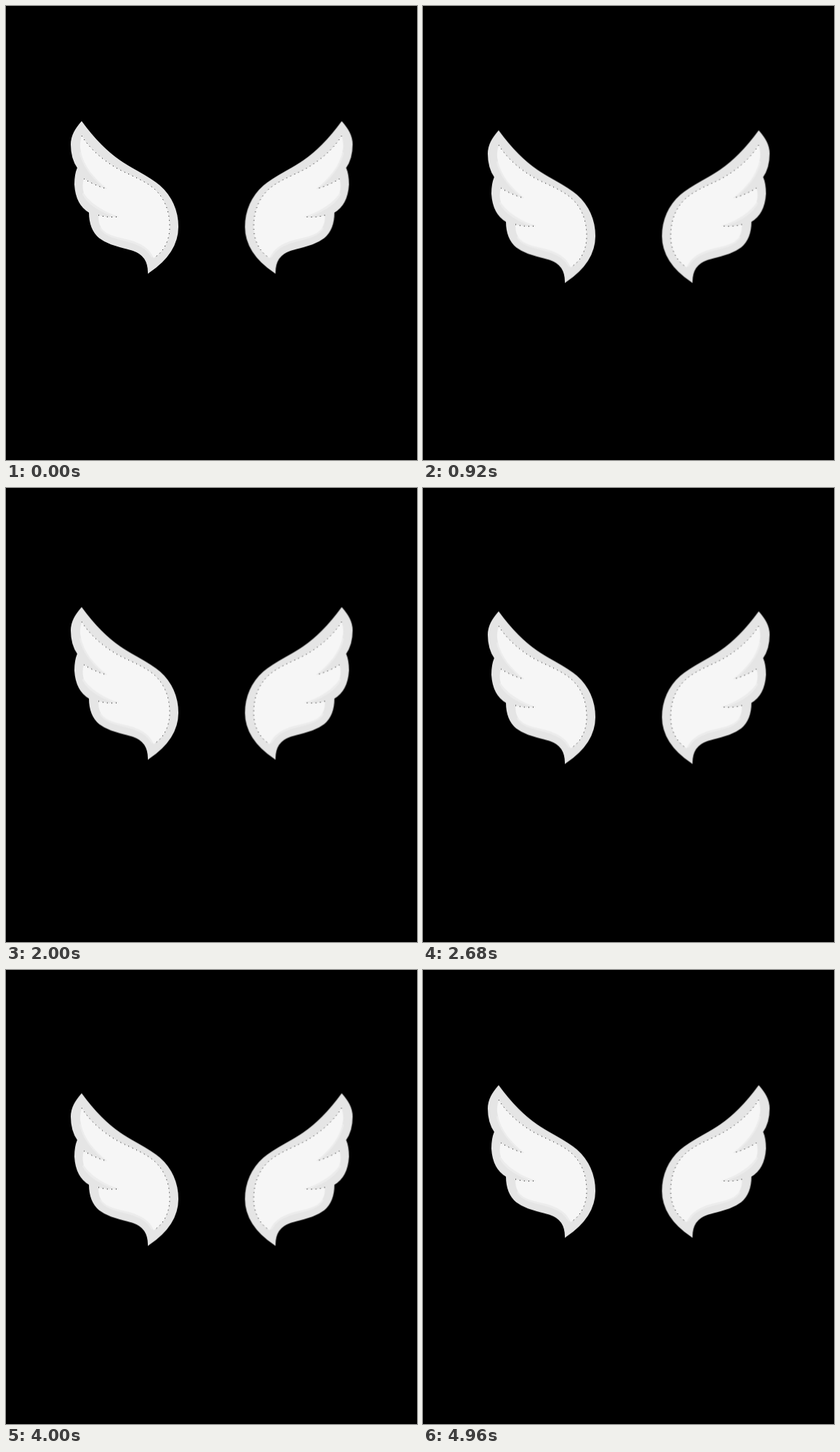
These frames come from a looping animation (565 px wide and 623 px high, 5000 ms). An HTML page:

```html
<!DOCTYPE html>
<html lang="en">
<head>
<meta charset="utf-8">
<title>Wings</title>
<style>
  html, body { margin: 0; width: 100%; height: 100%; overflow: hidden; background: #000; }
  svg { display: block; width: 565px; height: 623px; }
  .rim { fill: #e5e5e5; stroke: #e5e5e5; stroke-width: 2; }
  .shade { fill: none; stroke: #ececec; stroke-width: 4; stroke-linecap: round; }
  .feathers { fill: #f6f6f6; }
  .dots { fill: none; stroke: #000; stroke-width: 1; stroke-dasharray: 1 5; }
  .bob { animation: bob 5s cubic-bezier(.37, 0, .63, 1) infinite; }
  @keyframes bob {
    0%, 32.2%, 66.9%, 100% { transform: translateY(0); }
    16.8%, 49.6%, 84.2% { transform: translateY(13px); }
  }
</style>
</head>
<body>
<svg viewBox="0 0 565 623">
  <defs>
    <g id="wing">
      <path class="rim" d="M104 159.5
        C119 180 135 198 157 213 C176 226 196 234 211 247
        C227 261 236 281 236 303 C236 330 219 350 196 365.5
        C196 350 190 340 175 335 C159 330 142 328 129 318
        C118 309 115 296 115 283 C101 275 96 261 95 245
        C95 236 96 229 99 222 C92 212 90 202 90 190
        C90 178 96 169 104 159.5Z"/>
      <path class="shade" d="M103 202C107 219 119 234 133 246M107 258C114 271 131 281 148 287M131 305C139 318 163 319 178 325C190 329 197 336 201 343"/>
      <path class="feathers" d="M104 178
        C116 197 134 212 153 223 C172 233 190 239 204 251
        C218 264 225 281 225 303 C225 323 216 338 203 346
        C198 334 189 328 176 323 C158 317 143 317 134 308
        C128 302 127 295 127 287 C137 290 147 290 155 289
        C136 283 116 271 107 257 C105 250 105 243 107 237
        C115 242 127 248 139 251 C121 236 107 220 103 200
        C101 192 102 185 104 178Z"/>
      <path class="dots" d="M104 178C116 197 134 212 153 223C172 233 190 239 204 251C218 264 225 281 225 303C225 323 216 338 203 346M107 237C115 242 127 248 139 251M127 287C137 290 147 290 155 289"/>
    </g>
  </defs>
  <g class="bob">
    <use href="#wing"/>
    <use href="#wing" transform="matrix(-1 0 0 1 565.5 0)"/>
  </g>
</svg>
</body>
</html>
```
